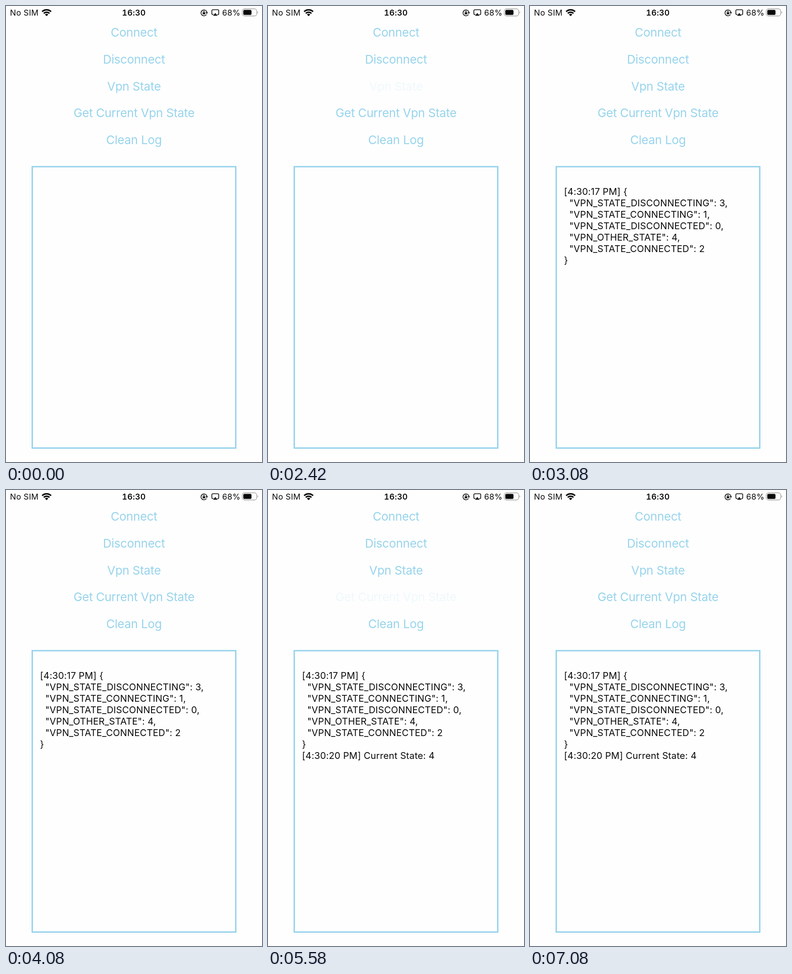
Animation, 561 px wide and 997 px high, one loop 8000 ms. Source, as an HTML page:

```html
<!DOCTYPE html>
<html lang="en">
<head>
<meta charset="utf-8">
<title>VPN state log</title>
<style>
  html, body { margin: 0; width: 100%; height: 100%; overflow: hidden; background: #fefefe; }
  svg { display: block; width: 561px; height: 997px; }
  text { font-family: Inter, Roboto, sans-serif; }

  .status text { font-size: 17.5px; letter-spacing: .4px; fill: #0a0a0a; }
  .status .clock { font-weight: 600; font-feature-settings: "tnum"; text-anchor: middle; }
  .line { fill: none; stroke: #0a0a0a; }

  .buttons text { font-size: 26px; letter-spacing: -.25px; fill: #98d4ec; text-anchor: middle; }
  .frame { fill: none; stroke: #97d3ec; stroke-width: 3; }
  .log text { font-size: 20.3px; letter-spacing: .2px; fill: #0a0a0a; }

  .list-press, .current-press, .list-log, .current-log { animation: 8s step-end infinite; }
  .list-press { animation-name: list-press; }
  .current-press { animation-name: current-press; }
  .list-log { animation-name: list-log; }
  .current-log { animation-name: current-log; }

  @keyframes list-press {
    0% { opacity: 1; }
    30.25% { opacity: .13; }
    31.25% { opacity: .23; }
    32.25% { opacity: .5; }
    33.375% { opacity: .85; }
    34.375%, 100% { opacity: 1; }
  }
  @keyframes current-press {
    0% { opacity: 1; }
    68.75% { opacity: .15; }
    69.75% { opacity: .14; }
    70.875% { opacity: .45; }
    71.875% { opacity: .8; }
    72.875%, 100% { opacity: 1; }
  }
  @keyframes list-log {
    0% { opacity: 0; }
    31.25%, 100% { opacity: 1; }
  }
  @keyframes current-log {
    0% { opacity: 0; }
    69.75%, 100% { opacity: 1; }
  }
</style>
</head>
<body>
<svg viewBox="0 0 561 997">
  <g class="status">
    <text x="8.8" y="21">No SIM</text>
    <text class="clock" x="280.2" y="21">16:30</text>
    <text x="473.8" y="21">68%</text>

    <!-- wifi -->
    <g class="line" stroke-width="3.2">
      <path d="M79.2 12.4A14 14 0 0 1 98.8 12.4"/>
      <path d="M82.7 16.2A9 9 0 0 1 95.3 16.2"/>
    </g>
    <path d="M89 22.3L85.2 18.5A5.4 5.4 0 0 1 92.8 18.5Z" fill="#0a0a0a"/>

    <!-- rotation lock -->
    <path class="line" stroke-width="1.6" d="M439.3 18.6A6.5 6.5 0 1 1 440.2 13.6"/>
    <path d="M437.4 13.8H442.6L440 17.4Z" fill="#0a0a0a"/>
    <rect x="431" y="14" width="5.6" height="4.3" rx=".7" fill="#0a0a0a"/>
    <path class="line" stroke-width="1.1" d="M432.2 14.4V12.7A1.6 1.6 0 0 1 435.4 12.7V14.4"/>

    <!-- screen mirroring -->
    <path class="line" stroke-width="1.6" d="M454.6 18.7H453.2A2 2 0 0 1 451.2 16.7V10.2A2 2 0 0 1 453.2 8.2H464.2A2 2 0 0 1 466.2 10.2V16.7A2 2 0 0 1 464.2 18.7H462.8"/>
    <path d="M458.7 15.2L463.6 21.2H453.8Z" fill="#0a0a0a"/>

    <!-- battery -->
    <rect x="517.8" y="6.3" width="31.6" height="15.4" rx="4.8" fill="none" stroke="#a3a3a3" stroke-width="1.4"/>
    <rect x="520" y="8.4" width="18" height="11.2" rx="2.8" fill="#0a0a0a"/>
    <path d="M551 11.6A2.8 2.8 0 0 1 551 16.6Z" fill="#a3a3a3"/>
  </g>

  <g class="buttons">
    <text x="280.5" y="67.4">Connect</text>
    <text x="280.5" y="126">Disconnect</text>
    <text class="list-press" x="280.5" y="184.8">Vpn State</text>
    <text class="current-press" x="280.5" y="243.4">Get Current Vpn State</text>
    <text x="280.5" y="302">Clean Log</text>
  </g>

  <rect class="frame" x="57.5" y="351.3" width="446" height="615.2"/>

  <g class="log">
    <g class="list-log">
      <text x="74.5" y="413.4">[4:30:17 PM] {</text>
      <text x="85.9" y="438.4">"VPN_STATE_DISCONNECTING": 3,</text>
      <text x="85.9" y="463.3">"VPN_STATE_CONNECTING": 1,</text>
      <text x="85.9" y="488.3">"VPN_STATE_DISCONNECTED": 0,</text>
      <text x="85.9" y="513.3">"VPN_OTHER_STATE": 4,</text>
      <text x="85.9" y="538.3">"VPN_STATE_CONNECTED": 2</text>
      <text x="74.5" y="563.2">}</text>
    </g>
    <text class="current-log" x="74.5" y="588">[4:30:20 PM] Current State: 4</text>
  </g>
</svg>
</body>
</html>
```
